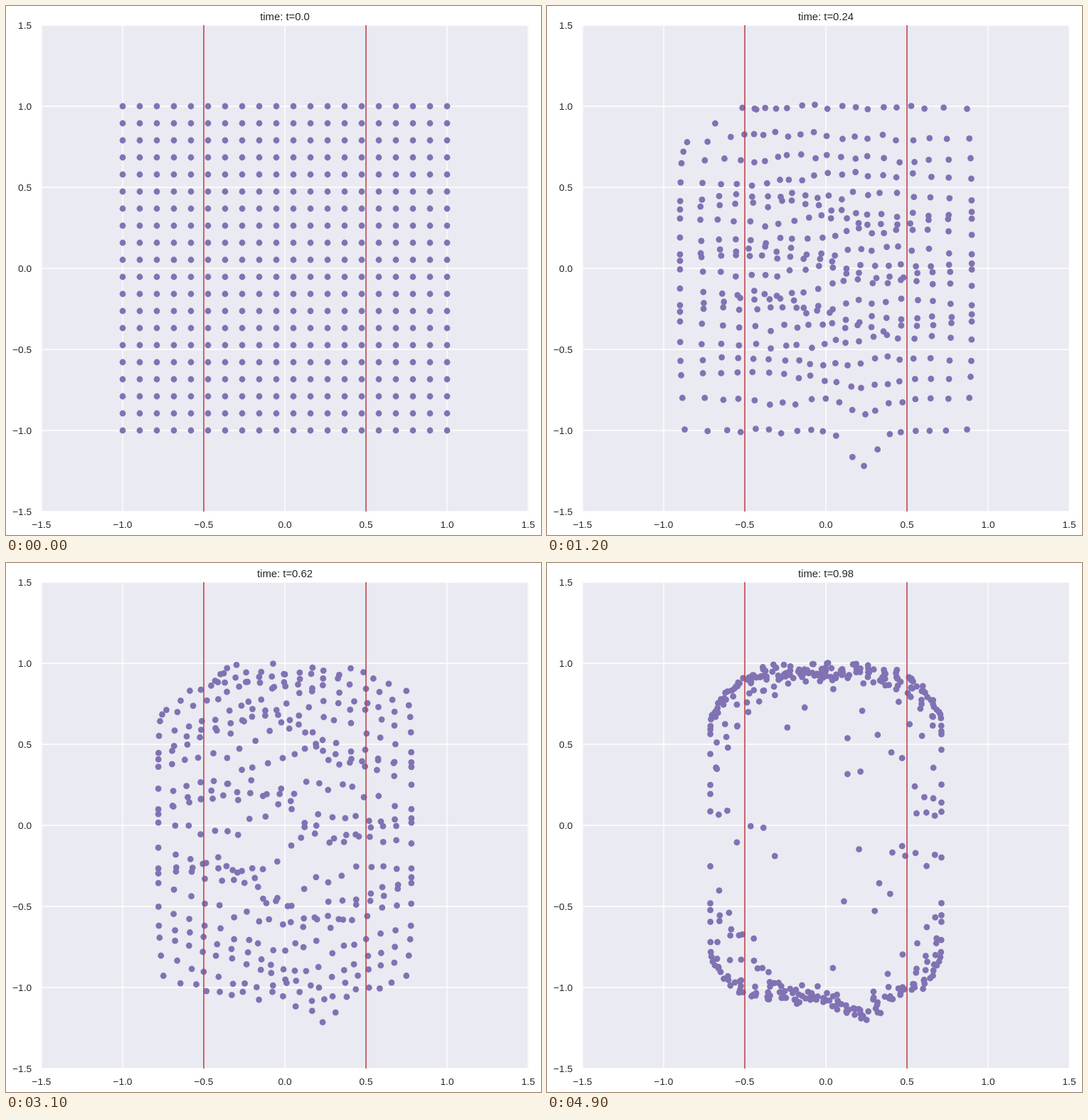
An HTML page that plays this animation: 752x744 px, repeating every 5 s.

```html
<!DOCTYPE html>
<html lang="en">
<head>
<meta charset="utf-8">
<title>Point flow</title>
<style>
  html, body { margin: 0; width: 100%; height: 100%; overflow: hidden; background: #fff; }
  svg { display: block; width: 752px; height: 744px; }
  text { font-family: "Liberation Sans", Arial, sans-serif; font-size: 13.6px; fill: #262626; }
  .title { font-size: 14.85px; text-anchor: middle; }
</style>
</head>
<body>
<svg viewBox="0 0 752 744"></svg>
<script>
const svg = document.querySelector('svg');
const N = 20, STEP = 100, STEPS = 50, UNIT = 228;
const px = x => 392 + x * UNIT;
const py = y => 369 - y * UNIT;

function add(tag, attrs, text) {
  const el = document.createElementNS('http://www.w3.org/2000/svg', tag);
  for (const k in attrs) el.setAttribute(k, attrs[k]);
  if (text) el.textContent = text;
  return svg.appendChild(el);
}
const line = (x1, y1, x2, y2, stroke, width) =>
  add('line', { x1, y1, x2, y2, stroke, 'stroke-width': width });

// Axes
add('rect', { x: 49, y: 27, width: 686, height: 684, fill: '#eaeaf2' });
for (let v = -1.5; v <= 1.5; v += 0.5) {
  const x = px(v), y = py(v);
  const label = v.toFixed(1).replace('-', '\u2212');
  line(x, 27, x, 711, '#fff', 1.35);
  line(49, y, 735, y, '#fff', 1.35);
  add('text', { x, y: 733.5, 'text-anchor': 'middle' }, label);
  add('text', { x: 36, y: y + 5, 'text-anchor': 'end' }, label);
}
const title = add('text', { x: 392, y: 19.5, class: 'title' });

let seed = 7;
function rand() {
  seed = (seed * 16807) % 2147483647;
  return seed / 1073741823.5 - 1;
}
const bump = (v, mid, width) => Math.exp(-(((v - mid) / width) ** 2));

const dots = [];
for (let c = 0; c < N; c++) {
  for (let r = 0; r < N; r++) {
    dots.push({
      X: -1 + 2 * c / (N - 1),
      Y: 1 - 2 * r / (N - 1),
      noise: [rand(), rand(), rand()],
      el: add('circle', { r: 4.4, fill: '#8172b3' })
    });
  }
}
for (const v of [-0.5, 0.5]) line(px(v), 27, px(v), 711, '#bc424a', 1.6);

// First the grid contracts into clumps, then it is driven out to a ring.
function place({ X, Y, noise }, t) {
  const grow = Math.sin(Math.PI / 2 * Math.min(1, t / 0.4));
  const X4 = X ** 4, Y4 = Y ** 4, Y8 = Y ** 8;
  const inner = 1 - X4;
  const top = Y > 0 ? Y8 : 0, bottom = Y < 0 ? Y8 : 0;
  const dip = bump(X, 0.25, 0.15);

  const core = 0.66 + 0.34 * Math.exp(-t / 0.2) + 0.15 * t * t;
  const side = 1 - 0.46 * t + 0.17 * t * t;
  let x = X * (core + (side - core) * X4) * (1 - 0.04 * Y ** 6 * grow);
  x += grow * (0.16 * bump(X, -0.75, 0.17) * top
    + inner * (0.015 * noise[0] - 0.03 * Y + 0.02 * Math.sin(6 * Y + 4 * X)));

  const clump = 0.05 - 0.12 * Math.sin(3 * X);
  let y = Y - grow * ((1 - Y4) * (0.33 * Y + 0.04 * Math.sin(15 * (Y - clump)))
    + 0.27 * bump(X, -1, 0.12) * top + 0.28 * dip * bottom
    - 0.025 * inner * noise[1]);

  // logistic growth away from the split line
  const split = -0.04 * grow;
  const up = y > split;
  const ring = (up ? 1 - 0.27 * X4 : 1.03 - 0.22 * X4 + 0.12 * dip)
    + 0.045 * noise[2] * inner;
  const rate = 1.7 + 4.4 * (1 - Math.abs(X));
  const gain = Math.exp(rate * 0.67 * t ** 3);
  const z = (y - split) / ring;
  y = split + ring * z * gain / Math.sqrt(1 + z * z * (gain * gain - 1));
  return [px(x), py(y)];
}

function draw(step) {
  const t = step / STEPS;
  title.textContent = 'time: t=' + (step ? String(+t.toFixed(2)) : '0.0');
  for (const d of dots) {
    const [x, y] = place(d, t);
    d.el.setAttribute('cx', x.toFixed(2));
    d.el.setAttribute('cy', y.toFixed(2));
  }
}

let last = -1;
const start = performance.now();
function tick() {
  const step = Math.floor((performance.now() - start) / STEP) % STEPS;
  if (step !== last) draw(last = step);
  requestAnimationFrame(tick);
}
tick();
</script>
</body>
</html>
```
